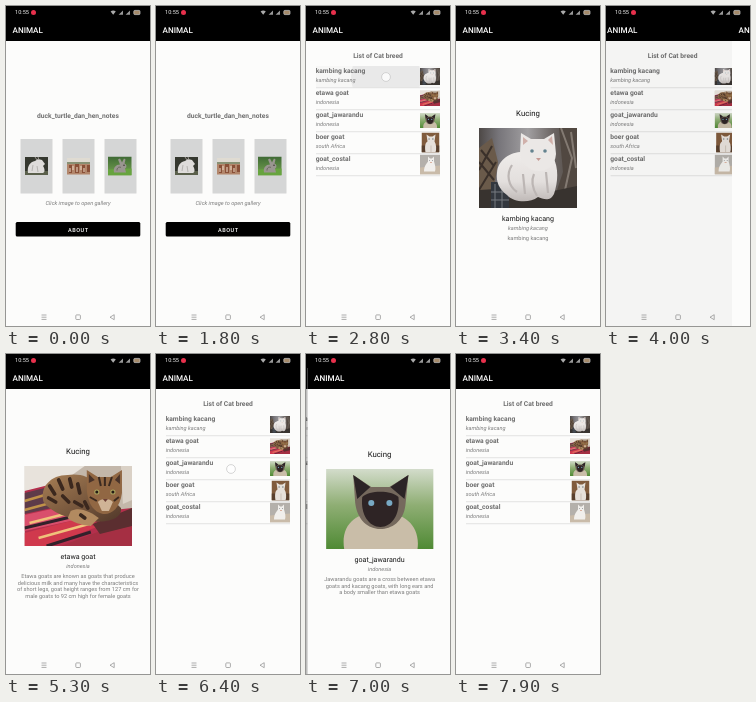
An HTML page that plays this animation: 144x320 px, repeating every 8 s.

```html
<!DOCTYPE html>
<html lang="en">
<head>
<meta charset="utf-8">
<title>Animal</title>
<style>
  html, body { margin: 0; width: 100%; height: 100%; overflow: hidden; background: #fcfcfb; }
  svg { display: block; }
  #stage { position: absolute; left: 0; top: 0; width: 144px; height: 320px; }
  text { font-family: Roboto, "Liberation Sans", sans-serif; font-size: 5.6px; fill: #7c7c7c; text-rendering: geometricPrecision; }
  .mid { text-anchor: middle; }
  .bold { font-size: 6.7px; font-weight: 700; fill: #6f6f6f; }
  .it { font-style: italic; }
  .name { font-size: 7.1px; fill: #151515; }
  .head { font-size: 7.8px; fill: #151515; }
  .bar { font-size: 8.1px; font-weight: 500; fill: #fff; }
  .btn { font-weight: 500; fill: #fff; letter-spacing: .5px; }
</style>
</head>
<body>
<svg id="stage" viewBox="0 0 144 320">
  <defs>
    <filter id="soft" x="-10%" y="-10%" width="120%" height="120%"><feGaussianBlur stdDeviation=".7"/></filter>
    <linearGradient id="wall" x2="1"><stop stop-color="#4d4846"/><stop offset=".2" stop-color="#77757a"/><stop offset=".5" stop-color="#a19fa1"/><stop offset=".75" stop-color="#6c6664"/><stop offset="1" stop-color="#4e4640"/></linearGradient>
    <linearGradient id="fur" x2="0" y2="1"><stop stop-color="#efecea"/><stop offset=".6" stop-color="#e3dfdd"/><stop offset="1" stop-color="#bfb9b7"/></linearGradient>
    <linearGradient id="tabby" x2="1" y2="1"><stop stop-color="#a87f55"/><stop offset="1" stop-color="#51382a"/></linearGradient>
    <linearGradient id="lawn" x2="0" y2="1"><stop stop-color="#3f6a35"/><stop offset="1" stop-color="#76a350"/></linearGradient>
    <linearGradient id="garden" x2="0" y2="1"><stop stop-color="#d3dccb"/><stop offset=".45" stop-color="#8fae74"/><stop offset="1" stop-color="#4f8a34"/></linearGradient>

    <symbol id="white" viewBox="0 0 98 80" preserveAspectRatio="none">
      <rect width="98" height="80" fill="url(#wall)"/>
      <g filter="url(#soft)">
        <path d="M0 20L13 10L19 34L12 80H0Z" fill="#6a5a4a"/>
        <path d="M2 22L15 38M0 34L15 52M13 18L0 42M17 34L0 62" stroke="#3a302a" stroke-width="2"/>
        <path d="M80 0H98V80H72L84 44Z" fill="#514841"/>
        <path d="M82 0L93 30L86 62M92 4L97 40" fill="none" stroke="#837a72" stroke-width="2"/>
        <path d="M0 62L34 60L60 66L98 58V80H0Z" fill="#38332f"/>
        <path d="M12 54H30V80H12Z" fill="#33383f"/>
        <path d="M16 56V80M23 56V80M12 64H30M12 72H30" stroke="#777b80"/>
        <path d="M18 45C19 31 32 24 43 24L74 29C80 40 79 54 75 66C71 74 64 71 59 69C50 76 34 74 28 67C20 61 17 54 18 45Z" fill="url(#fur)"/>
        <path d="M41 25L42 5L52 11L65 11L75 5L77 26C76 39 66 44 59 43C50 43 42 35 41 25Z" fill="#ebe8e6"/>
        <path d="M44 17L44 9L49 13ZM69 12L73 8L74 17Z" fill="#d0b0aa"/>
        <path d="M33 37C27 46 29 58 38 64M55 46C51 55 55 63 58 68M67 44L69 65M44 46L46 66" fill="none" stroke="#bcb6b4" stroke-width="2.2"/>
        <g fill="#64838f"><circle cx="53" cy="23" r="1.8"/><circle cx="66" cy="23" r="1.8"/></g>
        <path d="M57 30H62L59.5 33Z" fill="#c69a94"/>
      </g>
    </symbol>

    <symbol id="spotted" viewBox="0 0 107 80" preserveAspectRatio="none">
      <rect width="107" height="80" fill="#c3b7aa"/>
      <g filter="url(#soft)">
        <path d="M0 0H60L32 20L0 25Z" fill="#e8e3dc"/>
        <path d="M96 0H107V34L98 38Z" fill="#dad1c6"/>
        <path d="M0 25L24 19L70 46L107 42V80H0Z" fill="#b42f4c"/>
        <path d="M0 27L24 21L36 40L0 48Z" fill="#5e3b49"/>
        <path d="M0 35L27 27M0 44L33 35" stroke="#c09248" stroke-width="2.5"/>
        <path d="M0 49L36 41L55 53L0 65Z" fill="#d94f6c"/>
        <path d="M0 67L50 54L72 61L22 80H0Z" fill="#d0394d"/>
        <path d="M5 57L44 47M14 72L64 58" stroke="#f0c27b" stroke-width="2.5"/>
        <path d="M0 62L46 51M22 80L66 66" stroke="#32212a" stroke-width="3"/>
        <path d="M36 80L78 64L107 58V80Z" fill="#a52f43"/>
        <path d="M68 58L107 42V60L75 68Z" fill="#5b2e30"/>
        <path d="M19 36C15 21 26 9 43 9C53 7 65 10 72 18L96 42C98 55 75 58 60 54C44 53 27 47 19 36Z" fill="url(#tabby)"/>
        <path d="M46 45C55 40 66 46 74 52L66 60C56 59 47 56 43 52Z" fill="#b28a60"/>
        <g stroke="#3b281e" stroke-width="3.7" stroke-linecap="round"><path d="M25 20L30 28M34 14L38 23M45 13L47 21M24 32L31 36M38 30L44 36M53 18L55 27M50 36L57 40M60 36L63 42M56 49L60 52"/></g>
        <path d="M62 24L62 4L73 11L86 11L97 4L97 27C95 42 87 48 80 48C71 48 63 39 62 24Z" fill="#916743"/>
        <path d="M64 17L64 8L70 14ZM90 14L95 8L95 18Z" fill="#49332a"/>
        <path d="M74 11L76 20M80 11V20M87 11L84 20M65 31L72 35M94 31L89 35" stroke="#3b2a20" stroke-width="2"/>
        <path d="M73 36C76 32 85 32 88 36L84 45H77Z" fill="#cfb396"/>
        <g fill="#aaa35e"><circle cx="72" cy="26" r="2.6"/><circle cx="88" cy="26" r="2.6"/></g>
        <g fill="#241b16"><circle cx="72" cy="26" r="1.5"/><circle cx="88" cy="26" r="1.5"/></g>
        <path d="M78 33H83L80.5 36Z" fill="#6e4037"/>
      </g>
    </symbol>

    <symbol id="dark" viewBox="0 0 107 80" preserveAspectRatio="none">
      <rect width="107" height="80" fill="url(#garden)"/>
      <g filter="url(#soft)">
        <path d="M18 80C14 54 32 42 55 43C80 43 94 59 91 80Z" fill="#c9bda8"/>
        <path d="M29 34L27 6L45 18H63L82 6L79 36C77 53 65 60 54 60C42 60 31 51 29 34Z" fill="#75695d"/>
        <path d="M27 6L44 18L31 30ZM82 6L64 18L78 30Z" fill="#2b2426"/>
        <path d="M36 28C43 21 65 21 72 28C74 46 65 58 54 58C43 58 34 46 36 28Z" fill="#2e2425"/>
        <g fill="#78a9c4"><circle cx="45" cy="34" r="3"/><circle cx="63" cy="34" r="3"/></g>
      </g>
    </symbol>

    <symbol id="tan" viewBox="0 0 18 20" preserveAspectRatio="none">
      <rect width="18" height="20" fill="#805b3d"/>
      <path d="M0 13H18V20H0Z" fill="#59402e"/>
      <path d="M4 20C3 13 4 10 6 9L5 2L8 4H11L14 2L13 9C15 12 15 17 14 20Z" fill="#e6e0da"/>
      <path d="M7 6.5H8.2M10.7 6.5H12" stroke="#54616a"/>
      <path d="M9.5 13V20" stroke="#bfb4a9" stroke-width=".7"/>
    </symbol>

    <symbol id="pale" viewBox="0 0 20 20" preserveAspectRatio="none">
      <rect width="20" height="20" fill="#b4b0ab"/>
      <path d="M0 13L20 11V20H0Z" fill="#c9bba9"/>
      <path d="M4 17C4 11 7 9 8 7L8 2L10 4H12L14 2L14 7C15 10 16 14 15 17Z" fill="#f1efec"/>
      <path d="M9.3 6H10M12.2 6H13" stroke="#697078" stroke-width=".7"/>
      <path d="M10 8H12" stroke="#d5a18c" stroke-width=".8"/>
    </symbol>
    <clipPath id="row"><rect id="rowBox" x="10" width="124" height="21.4"/></clipPath>
  </defs>

  <g id="home" class="page">
    <text class="bold mid" x="72" y="112">duck_turtle_dan_hen_notes</text>
    <path d="M14.5 133H46.5V187.5H14.5ZM56.5 133H88.5V187.5H56.5ZM98.5 133H130.5V187.5H98.5Z" fill="#d5d6d6"/>
    <svg x="19" y="151" width="23" height="18">
      <rect width="23" height="18" fill="#35382f"/>
      <path d="M0 14H23V18H0Z" fill="#5a604b"/>
      <path d="M3 16C2 9 5 5 10 4L13 2L17 3L20 7L18 9C20 12 20 15 18 16Z" fill="#dedcda"/>
      <path d="M12 3L10 0M14 3L13 0" stroke="#99958f"/>
      <path d="M8 8L7 14M12 9L13 15" stroke="#b5b3b0"/>
    </svg>
    <svg x="61" y="152" width="23" height="16.5">
      <rect width="23" height="17" fill="#b2866b"/>
      <path d="M0 0H23V4H0Z" fill="#dfdbd2"/>
      <path d="M0 4H23V6H0Z" fill="#879074"/>
      <path d="M2 15V7H5V15M8 15V6H12V15M15 15V7H18V15M20 14V7H23V14" fill="#895038"/>
      <path d="M3 10V14M10 9V14M17 10V14M6 8V12M14 8V12" stroke="#ead3bf" stroke-width="1.1"/>
    </svg>
    <svg x="102" y="150.5" width="23.5" height="19">
      <rect width="24" height="19" fill="url(#lawn)"/>
      <path d="M0 13L24 12V19H0Z" fill="#67a43f"/>
      <path d="M6 16C5 11 8 8 12 8L10 3L12 2L14 6L16 2L17.5 3L16.5 7C19 8 19 11 17 12L18 16Z" fill="#9a9690"/>
      <path d="M9 14C9 11 11 10 13 11" fill="none" stroke="#69655f"/>
      <circle cx="16" cy="8.8" r=".7" fill="#27231f"/>
    </svg>
    <text class="it mid" x="72" y="199.4">Click image to open gallery</text>
    <rect x="9.7" y="216" width="124.6" height="14.6" rx="1.5" fill="#000"/>
    <text class="btn mid" x="72.3" y="225.6">ABOUT</text>
  </g>

  <g id="list" class="page">
    <text class="bold mid" x="72" y="52.2">List of Cat breed</text>
    <g id="press" clip-path="url(#row)">
      <rect id="tint" x="10" width="124" height="22"/>
      <circle id="ripple"/>
    </g>
    <g id="rows"></g>
  </g>

  <g id="status">
    <rect width="144" height="14" fill="#000"/>
    <text x="9" y="8.3" style="font-size:5.6px;fill:#eee">10:55</text>
    <circle cx="27.5" cy="6.4" r="2.5" fill="#e8304c"/>
    <path d="M104.6 5.6L107.2 8.8L109.8 5.6Q107.2 3.6 104.6 5.6Z" fill="#aaa"/>
    <path d="M112.6 8.8H117V4.6ZM119.6 8.8H124V4.6Z" fill="#999"/>
    <rect x="127.8" y="4.4" width="6.2" height="4.2" rx="1" fill="#a58a6a" stroke="#ccc" stroke-width=".7"/>
  </g>
  <g fill="none" stroke="#8a8a8a" stroke-width=".7">
    <path d="M35.5 309H40.5M35.5 311.2H40.5M35.5 313.4H40.5"/>
    <rect x="69.8" y="308.9" width="4.6" height="4.6" rx=".8"/>
    <path d="M108.2 308.7V313.7L104 311.2Z" stroke-linejoin="round"/>
  </g>
  <circle id="dot" r="4.4" fill="#fff" fill-opacity=".75" stroke="#c4c4c4" stroke-width=".7"/>
</svg>
<script>
  const $ = id => document.getElementById(id);
  const stage = $('stage');
  const W = 144, LOOP = 8000, STEP = 100, ROW = 22, TOP = 81.7;

  const photo = (id, x, y, w, h) => `<use href="#${id}" x="${x}" y="${y}" width="${w}" height="${h}"/>`;
  const label = (cls, x, y, s) => `<text class="${cls}" x="${x}" y="${y}">${s}</text>`;

  const breeds = [
    ['kambing kacang', 'kambing kacang', 'white', 114, 62, 20, 17],
    ['etawa goat', 'indonesia', 'spotted', 114, 84.5, 20, 15.5],
    ['goat_jawarandu', 'indonesia', 'dark', 114, 107, 20, 15],
    ['boer goat', 'south Africa', 'tan', 115.5, 126.5, 18, 20],
    ['goat_costal', 'indonesia', 'pale', 114, 148.5, 20, 20]
  ];
  $('rows').innerHTML = breeds.map(([name, place, id, ...box], i) => {
    const y = i * ROW;
    return label('bold', 9.7, 67.3 + y, name) + label('it', 9.7, 75.7 + y, place) + photo(id, ...box) +
      `<path d="M10 ${TOP + y}H134" stroke="#d2d2d2" stroke-width=".6"/>`;
  }).join('');

  function addDetail(i, x, y, w, lines) {
    const [name, place, id] = breeds[i];
    const g = document.createElementNS(stage.namespaceURI, 'g');
    g.id = 'detail' + i;
    g.setAttribute('class', 'page');
    g.innerHTML = label('head mid', 72, y - 12.2, 'Kucing') + photo(id, x, y, w, 80) +
      label('name mid', 72, y + 93.3, name) + label('it mid', 72, y + 101.6, place) +
      lines.map((s, n) => label('mid', 72, y + 112 + n * 6.7, s)).join('');
    stage.insertBefore(g, $('status'));
  }
  addDetail(0, 23, 122, 98, ['kambing kacang']);
  addDetail(1, 18.5, 112, 107.5, [
    'Etawa goats are known as goats that produce',
    'delicious milk and many have the characteristics',
    'of short legs, goat height ranges from 127 cm for',
    'male goats to 92 cm high for female goats']);
  addDetail(2, 18.5, 115, 107.5, [
    'Jawarandu goats are a cross between etawa',
    'goats and kacang goats, with long ears and',
    'a body smaller than etawa goats']);

  // Each page carries its own background, title bar and shade.
  const pages = {};
  document.querySelectorAll('.page').forEach(g => {
    g.insertAdjacentHTML('afterbegin', '<rect width="144" height="320" fill="#fcfcfb"/><rect width="144" height="35" fill="#000"/>' + label('bar', 6.5, 27.3, 'ANIMAL'));
    g.insertAdjacentHTML('beforeend', '<rect class="shade" width="144" height="320" opacity="0"/>');
    pages[g.id] = { g, shade: g.querySelector('.shade') };
  });

  // start, end, lower page, upper page, opening?
  const slides = [
    [2050, 2300, 'home', 'list', true],
    [2950, 3400, 'list', 'detail0', true],
    [3800, 4200, 'list', 'detail0', false],
    [4850, 5300, 'list', 'detail1', true],
    [5700, 6100, 'list', 'detail1', false],
    [6650, 7100, 'list', 'detail2', true],
    [7450, 7900, 'list', 'detail2', false]
  ];
  // start, end, x, y
  const taps = [
    [1400, 1700, 115, 162], [2700, 2900, 80, 71], [3800, 3900, 106, 311], [4700, 4900, 90, 92],
    [5700, 5800, 106, 311], [6400, 6600, 75, 115], [7400, 7500, 106, 311]
  ];
  // row, start, end, centre x, centre y, first radius
  const presses = [[0, 2700, 3400, 80, 71, 0], [1, 4700, 5300, 95, 79, 45], [2, 6400, 7100, 75, 115, 0]];

  const ease = p => 1 - (1 - p) ** 3;
  const set = (el, attrs) => { for (const k in attrs) el.setAttribute(k, attrs[k]); };

  function place(id, x, dim) {
    const { g, shade } = pages[id];
    g.style.display = 'inline';
    set(g, { transform: `translate(${x} 0)` });
    set(shade, { opacity: dim });
  }

  function draw(t) {
    for (const id in pages) pages[id].g.style.display = 'none';
    const s = slides.filter(v => v[0] <= t).pop();
    if (!s) place('home', 0, 0);
    else {
      const [start, end, low, high, opening] = s;
      const p = ease(Math.min(1, (t - start) / (end - start)));
      const cover = opening ? p : 1 - p;
      if (cover < 1) place(low, -W * .3 * cover, .25 * cover);
      if (cover > 0) place(high, W * (1 - cover), 0);
    }

    const tap = taps.find(v => t >= v[0] && t < v[1]);
    $('dot').style.display = tap ? 'inline' : 'none';
    if (tap) set($('dot'), { cx: tap[2], cy: tap[3] });

    const press = presses.find(v => t >= v[1] && t < v[2]);
    $('press').style.display = press ? 'inline' : 'none';
    if (press) {
      const [row, start, , cx, cy, r] = press;
      const y = TOP + (row - 1) * ROW, age = t - start;
      const fade = Math.max(0, Math.min(1, (500 - age) / 250));
      set($('rowBox'), { y: y + .3 });
      set($('tint'), { y, opacity: r || age ? .02 * fade : 0 });
      set($('ripple'), { cx, cy, r: r + age * .35, opacity: .055 * fade });
    }
  }

  function tick(now) {
    draw(Math.floor((now % LOOP + 4) / STEP) * STEP % LOOP);
    requestAnimationFrame(tick);
  }
  draw(0);
  requestAnimationFrame(tick);
</script>
</body>
</html>
```
